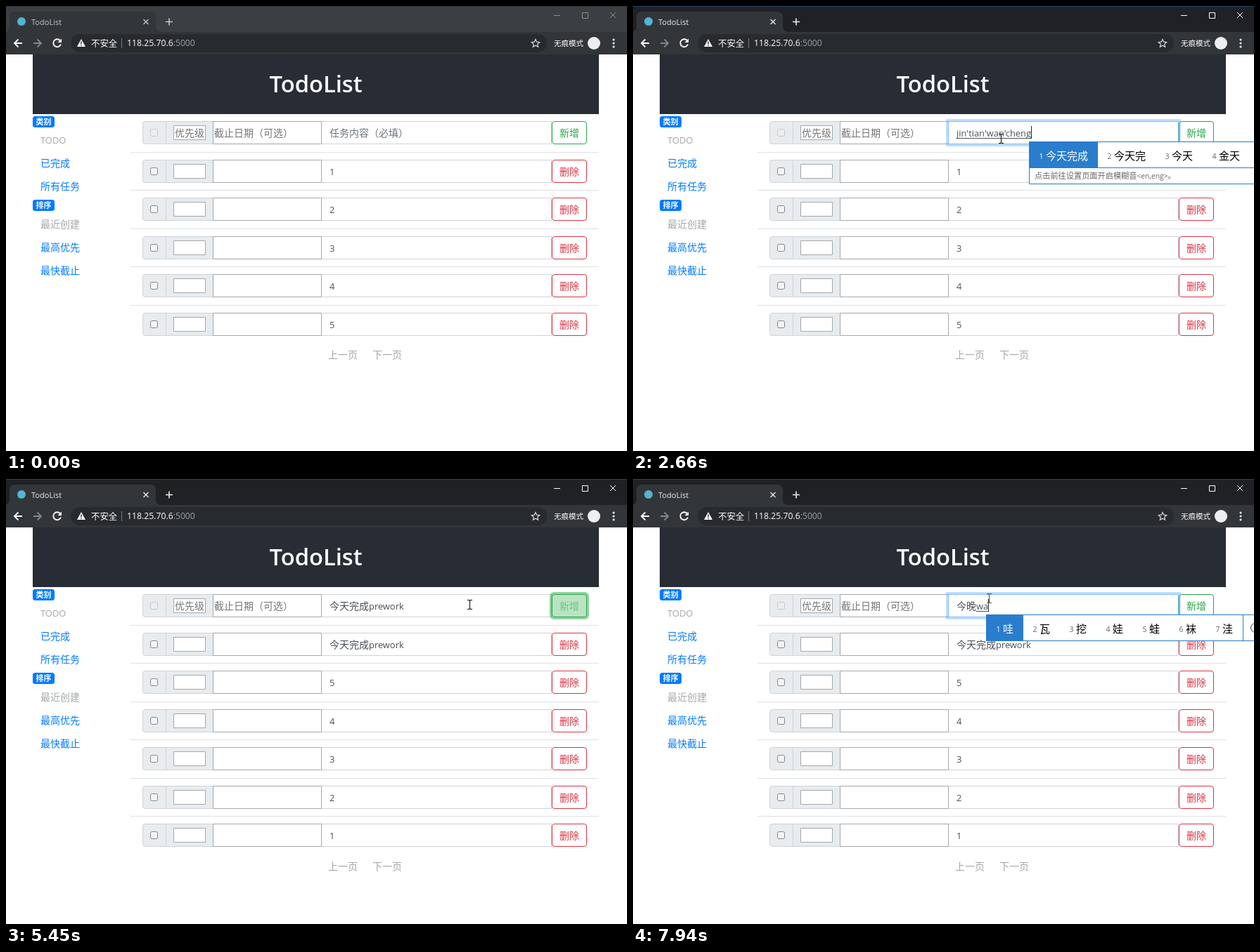
An HTML page with a canvas that plays this animation: 883x634 px, repeating every 8000 ms.

```html
<!DOCTYPE html>
<html lang="zh-CN">
<head>
<meta charset="utf-8">
<title>TodoList</title>
<style>
html, body { margin: 0; width: 883px; height: 634px; overflow: hidden; background: #fff; }
canvas { display: block; }
</style>
</head>
<body>
<canvas id="stage" width="883" height="634"></canvas>
<script>
const ctx = document.getElementById('stage').getContext('2d');
const LOOP = 8000, TEXT_X = 460;
const GREY = '#a3a8ab', BLUE = '#007bff', RED = '#dc3545', IME = '#2a7dcc';
const CJK_FONT = '"Noto Sans CJK SC","Noto Sans CJK",sans-serif';
const LATIN_FONT = '"Open Sans","Noto Sans",sans-serif';
const RUNS = /[\u3000-\u9fff\uff00-\uffef]+|[^\u3000-\u9fff\uff00-\uffef]+/g;

// Latin runs are set slightly smaller than the Chinese ones.
function eachRun(s, size, weight, draw) {
  let x = 0;
  for (const run of s.match(RUNS) || []) {
    const cjk = /[\u3000-\uffef]/.test(run);
    ctx.font = `${weight} ${cjk ? size : size * .92}px ${cjk ? CJK_FONT : LATIN_FONT}`;
    if (draw) draw(run, x);
    x += ctx.measureText(run).width;
  }
  return x;
}
const widthOf = (s, size = 14, weight = 400) => eachRun(s, size, weight);

// y is the vertical centre of the line
function text(s, x, y, color, size = 14, weight = 400) {
  ctx.fillStyle = color;
  eachRun(s, size, weight, (run, dx) => ctx.fillText(run, x + dx, y + size * .37));
}

function box(x, y, w, h, fill, stroke, r = 0) {
  ctx.beginPath();
  if (stroke) ctx.roundRect(x + .5, y + .5, w - 1, h - 1, r);
  else ctx.roundRect(x, y, w, h, r);
  if (fill) { ctx.fillStyle = fill; ctx.fill(); }
  if (stroke) { ctx.strokeStyle = stroke; ctx.lineWidth = 1; ctx.stroke(); }
}

function line(d, color, width = 1) {
  ctx.strokeStyle = color;
  ctx.lineWidth = width;
  ctx.stroke(new Path2D(d));
}

function shape(d, color) {
  ctx.fillStyle = color;
  ctx.fill(new Path2D(d));
}

function disc(x, y, r, color) {
  ctx.fillStyle = color;
  ctx.beginPath();
  ctx.arc(x, y, r, 0, 7);
  ctx.fill();
}

const mix = (a, b, k) => `rgb(${a.map((v, i) => Math.round(v + (b[i] - v) * k))})`;

// 150 ms ease-out transition beginning at start
function ramp(t, start) {
  const k = Math.min(1, Math.max(0, (t - start) / 150));
  return 1 - (1 - k) ** 2;
}

// Screen updates: first time, last time, number of steps
const BURSTS = [[0, 0, 1], [70, 380, 5], [530, 690, 3], [4590, 5370, 11], [5450, 6230, 11], [6310, 6310, 1], [6460, 6460, 1]];
function snap(t) {
  const [a, b, n] = BURSTS.filter(burst => burst[0] <= t).pop();
  if (n === 1) return a;
  const step = (b - a) / (n - 1);
  return a + step * Math.min(n - 1, Math.floor((t - a) / step + .001));
}

const MOUSE = [[70, 773, 396], [148, 705, 315], [225, 610, 222], [303, 540, 173], [380, 523, 189],
  [4640, 523, 189], [4760, 620, 186], [4910, 785, 183], [5000, 800, 185], [5250, 800, 184],
  [5370, 772, 181], [5450, 659, 179], [5620, 530, 176], [5690, 503, 175], [6300, 503, 175],
  [6310, 507, 171], [6459, 507, 171], [6460, 506, 170]];
function mouseAt(t) {
  const i = MOUSE.findIndex(m => m[0] > t);
  if (i < 0) return MOUSE[MOUSE.length - 1].slice(1);
  const [a, b] = [MOUSE[i - 1], MOUSE[i]], k = (t - a[0]) / (b[0] - a[0]);
  return [1, 2].map(j => Math.round(a[j] + (b[j] - a[j]) * k));
}

// time, committed text, composed letters, candidates, hint, letters the popup hangs on
// ('#' is the red tile, '|' the divider with a face)
const J = '就 将 叫 级 加 几 见 军', JI = '及 级 几 机 即 记 计 集', JIN = '进 仅 今 金 # 尽 近 紧';
const DAY = '今天 金条 近体 进 仅 今 金', TODAY = '今天 金天 锦天 进 仅 今 金';
const DONE = '今天完成 今天完 今天 金天 进 仅', WA = '哇 瓦 挖 娃 蛙 袜 洼 |';
const HOT = '怕热 偏热 偏了(le) 怕 篇 皮', IN = 'in,ing', AN = 'an,ang', EN = 'en,eng', WORK = 'prework 怕热我 偏热 怕 篇 皮';
const DID = '今天完成';
const TYPING = [
  [0, '', ''],
  [1230, '', 'j'], [1310, '', 'j', J], [1390, '', 'ji', JI],
  [1460, '', 'jin', JIN, IN, 'ji'], [1560, '', 'jin', JIN, IN],
  [1640, '', "jin't", DAY, IN, 'jin'], [1710, '', "jin't", DAY, IN],
  [1790, '', "jin'ti", DAY, IN], [1870, '', "jin'tia", TODAY, IN],
  [1950, '', "jin'tian", TODAY, IN, "jin'tia"], [2020, '', "jin'tian", TODAY, IN],
  [2110, '', "jin'tian'w", '今天哇 今天完 今天晚 今天我 今天为'],
  [2170, '', "jin'tian'wa", '今天哇 今天挖 今天娃 今天瓦 今天'],
  [2260, '', "jin'tian'wan", '今天玩 今天晚 今天完 今天万 今天', AN],
  [2340, '', "jin'tian'wan'c", DONE], [2420, '', "jin'tian'wan'ch", DONE],
  [2500, '', "jin'tian'wan'che", DONE], [2580, '', "jin'tian'wan'chen", DONE, EN],
  [2660, '', "jin'tian'wan'cheng", DONE, EN],
  [2830, DID, ''],
  [3050, DID, 'p', '怕 片 皮 票 平 篇 跑'],
  [3200, DID, "p'r", HOT, 'r,l'], [3275, DID, "p're", HOT, 'r,l', "p'r"], [3350, DID, "p're", HOT, 'r,l'],
  [3580, DID, "p're'w", '怕热我 怕热 偏热 怕 篇'], [3660, DID, "p're'wo", '怕热我 怕热 偏热 怕 篇'],
  [3735, DID, "p're'wo'r", WORK], [3810, DID, "p're'wo'r'k", WORK, '', "p're'wo'r"], [3890, DID, "p're'wo'r'k", WORK],
  [4040, DID + 'prework', ''],
  [6930, '', 'j', J], [7010, '', 'ji', JI], [7090, '', 'jin', JIN, IN],
  [7160, '', "jin'w", '今晚 金文 进 仅 今 金'], [7240, '', "jin'wa", '今晚 进 仅 今 金 尽'],
  [7320, '', "jin'wan", '今晚 金婉 进 仅 今 金 尽'],
  [7640, '今晚', ''], [7870, '今晚', 'w', '我 为 无 位 完 万 问 |'], [7940, '今晚', 'wa', WA]
];

function drawBrowser(active) {
  const ink = active ? '#fff' : '#8b8d90', title = active ? '#eceef0' : '#c5c7c9';
  box(0, 0, 883, 37, active ? '#202124' : '#3b3e42');
  box(0, 0, 883, 1, active ? '#1d4468' : '#33363a');
  shape('M-3 37Q5 37 5 29V16Q5 8 13 8H205Q213 8 213 16V29Q213 37 221 37Z', '#323639');
  box(0, 37, 883, 32, '#323639');
  disc(22, 22, 6, '#52b5d3');
  text('TodoList', 36, 22.5, title, 12);
  line('M195.5 19l7 7m0-7l-7 7', title, 1.3);
  line('M227 22.5h10m-5-5v10', title, 1.6);
  line('M779 13.5h9M819.5 9.5h8v8h-8zM859 9l8 8m0-8l-8 8', ink);
  line('M23 53H12M17.5 47.5L12 53L17.5 58.5', '#fff', 1.8);
  line('M39 53H50M44.5 47.5L50 53L44.5 58.5', '#85888b', 1.8);
  line('M77 49.2A5.5 5.5 0 1 0 78 54.5', '#fff', 1.8);
  shape('M79 46.5V52H73.5Z', '#fff');
  box(92, 40, 677, 26, '#282b2e', null, 13);
  shape('M107 47L113 58H101Z', '#fff');
  line('M107 50.5v4m0 1v1.5', '#282b2e', 1.4);
  text('不安全', 121, 53, '#fff', 12.4);
  line('M164.5 46v14', '#777a7d');
  text('118.25.70.6', 172, 52.5, '#fff', 13.3);
  text(':5000', 172 + widthOf('118.25.70.6', 13.3), 52.5, '#9da1a5', 13.3);
  line('M753 47.5l1.7 3.7 4 .4-3 2.7 .9 4-3.6-2.1-3.6 2.1 .9-4-3-2.7 4-.4z', '#d8dadc', 1.2);
  text('无痕模式', 779, 53, '#fff', 10.5);
  disc(836, 53, 9, '#eceef0');
  for (const y of [48, 53, 58]) disc(864, y, 1.5, '#fff');
}

function drawSidebar() {
  box(38, 69, 805, 85, '#282c34');
  text('TodoList', 440.5 - widthOf('TodoList', 35.5, 600) / 2, 109.5, '#fff', 35.5, 600);
  [['类别', 157], ['排序', 276]].forEach(([s, y]) => {
    box(38, y, 31, 16, BLUE, null, 3.5);
    text(s, 42.5, y + 8, '#fff', 11, 700);
  });
  ['TODO', '已完成', '所有任务', '最近创建', '最高优先', '最快截止'].forEach((s, i) =>
    text(s, 49, 191 + 33 * (i % 3) + (i > 2 ? 120 : 0), i % 3 ? BLUE : GREY));
}

function drawRow(i, label) {
  const y = Math.round(164.4 + 54.45 * i), mid = y + 17;
  if (i) box(177, y - 11, 666, 1, '#dfe1e3');
  box(194, y, 101, 33, '#e9ecef', '#ced4da', [3.5, 0, 0, 3.5]);
  box(227, y, 1, 33, '#ced4da');
  box(205, y + 11, 11, 11, i ? '#f4f4f4' : '#eceeef', i ? '#858585' : '#c6c8ca', 2);
  box(238, y + 6, 46, 21, '#fff', '#a5a7a9');
  box(448, y, 328, 33, '#fff', '#ced4da');
  box(294, y, 155, 33, '#fff', '#a5a7a9');
  if (!i) {
    text('优先级', 240, mid, '#757575');
    text('截止日期（可选）', 296, mid, '#757575');
    return;
  }
  text(label, TEXT_X, mid, '#495057');
  box(776, y, 50, 33, '#fff', RED, 3.5);
  text('删除', 787, mid, RED);
}

function drawAddButton(hover, ring) {
  const green = [40, 167, 69], white = [255, 255, 255];
  if (ring > 0) box(773, 161, 56, 39, `rgba(40,167,69,${ring / 2})`, null, 6);
  box(776, 164, 50, 33, mix(white, green, hover), mix(green, green, 0), 3.5);
  text('新增', 787, 181, mix(green, white, hover));
}

function drawEntry(t, focus, [, done, comp]) {
  if (focus > 0) {
    ctx.strokeStyle = `rgba(0,123,255,${focus / 4})`;
    ctx.lineWidth = 3;
    ctx.strokeRect(446.5, 162.5, 331, 36);
    box(448, 164, 328, 33, null, mix([206, 212, 218], [128, 189, 255], focus));
  }
  const selected = t >= 6000 && t < 6930;
  const start = TEXT_X + widthOf(done), end = start + widthOf(comp);
  if (selected) box(TEXT_X, 171, end - TEXT_X, 19, '#3390ff');
  if (done + comp) text(done + comp, TEXT_X, 181, selected ? '#fff' : '#495057');
  else text('任务内容（必填）', TEXT_X, 181, '#6c757d');
  if (selected) box(TEXT_X + 56, 187.5, end - TEXT_X - 56, 1.5, '#d8344f');
  if (comp) box(start, 188, end - start, 1, '#495057');
  const caretOn = t >= 530 && t < 1080 || t >= 1230 && t < 4590 || t >= 5760 && t < 6000 || t >= 6930;
  if (caretOn) box(Math.round(end), 171, 1, 18, '#222');
}

function drawPopup([, done, comp, words, hint, anchor = comp]) {
  if (!words) return;
  const left = Math.round(TEXT_X + widthOf(done) + widthOf(anchor)) - 3;
  box(left, 193, 900, 38, '#fff', IME);
  if (hint) {
    box(left, 230, 900, 24, '#fff', IME);
    text(`点击前往设置页面开启模糊音<${hint}>。`, left + 8, 242, '#666', 11.2, 500);
  }
  let x = left;
  words.split(' ').forEach((word, i) => {
    if (word === '|') {
      box(x + 1, 194, 1, 36, IME);
      ctx.strokeStyle = '#333';
      ctx.beginPath();
      ctx.arc(x + 19, 212, 6.5, 0, 7);
      ctx.stroke();
      return;
    }
    const tile = word === '#', w = 37 + (tile ? 20 : widthOf(word, 15));
    if (!i) box(x, 193, w + 1, 38, IME);
    text(String(i + 1), x + 14.5, 213.5, i ? '#666' : '#fff', 11.5);
    if (tile) {
      box(x + 25, 205, 17, 17, '#e2381b', '#7d2a1c');
      text('禁', x + 28, 213.5, '#fff', 11, 700);
    } else text(word, x + 24, 213, i ? '#000' : '#fff', 15);
    x += w;
  });
}

function drawMouse(t) {
  if (t < 70) return;
  const [x, y] = mouseAt(t);
  ctx.save();
  ctx.translate(x, y);
  if (x >= 776 && y < 198) {
    const hand = 'M-1 0Q1-2 2 0V6L9 8Q11 9 10 13L8 19H0L-5 11Q-5 8-1 11Z';
    shape(hand, '#fff');
    line(hand, '#000');
  } else line('M-3-6.5h2.5l1 1 1-1H4M.5-6v12M-3 6.5h2.5l1-1 1 1H4', t >= 6000 && t < 6930 ? '#555' : '#111', 1.1);
  ctx.restore();
}

function render(t) {
  const u = snap(t), typed = TYPING.filter(step => step[0] <= t).pop();
  const focus = ramp(u, 510) - ramp(u, 5140) + ramp(u, 5745);
  box(0, 0, 883, 634, '#fff');
  drawBrowser(t >= 530);
  drawSidebar();
  const rows = t < 5450 ? ['1', '2', '3', '4', '5'] : ['今天完成prework', '5', '4', '3', '2', '1'];
  ['', ...rows].forEach((label, i) => drawRow(i, label));
  const pager = 497 + 54.5 * (rows.length - 5);
  text('上一页', 458, pager, GREY);
  text('下一页', 521, pager, GREY);
  drawAddButton(ramp(u, 4900) - ramp(u, 5385), ramp(u, 5140) - ramp(u, 5745));
  drawEntry(t, focus, typed);
  drawPopup(typed);
  drawMouse(u);
}

const begin = performance.now();
function frame() {
  render((performance.now() - begin) % LOOP);
  requestAnimationFrame(frame);
}
frame();
</script>
</body>
</html>
```
